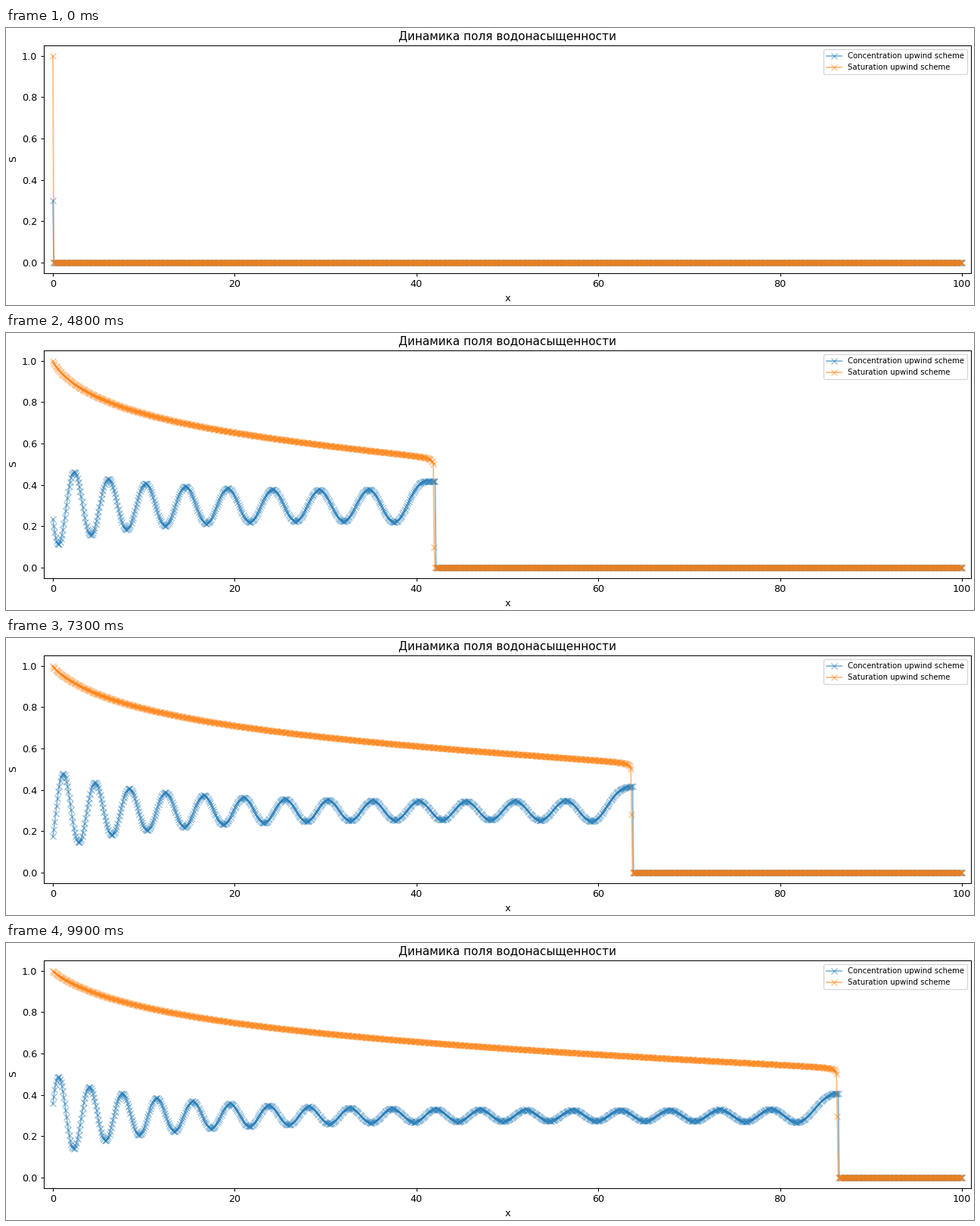
Animation of 1280 by 366 pixels, one loop 10 s. Source, as a matplotlib script:

```python
import numpy as np
import matplotlib.pyplot as plt
from matplotlib.animation import FuncAnimation

W, H, DPI = 1280, 366, 640 / 7
FRAMES, INTERVAL = 100, 100

# Grid and time stepping
CELLS, LENGTH = 1000, 100.0
FRAME_TIME, SUBSTEPS = 0.5856, 13
MOBILITY = 0.25
DRY = 1e-30

x = np.linspace(0, LENGTH, CELLS)
dt = FRAME_TIME / SUBSTEPS
ratio = dt / (x[1] - x[0])


def flux(s):
    """Fractional flow of water."""
    water = s ** 2.5
    return water / (water + MOBILITY * (1 - s) ** 2)


def inlet(t):
    return 0.3 + 0.2 * np.sin(2 * t)


def step(s, c, t):
    """One upwind step for saturation and the concentration it carries."""
    f = flux(s)
    s_new, c_new = s.copy(), np.zeros_like(c)
    s_new[1:] -= ratio * np.diff(f)
    wet = s_new[1:] > DRY
    share = ratio * f[:-1] / np.where(wet, s_new[1:], 1)
    c_new[1:] = np.where(wet, c[1:] - share * np.diff(c), 0)
    c_new[0] = inlet(t)
    return s_new, c_new


def simulate():
    s, c = np.zeros(CELLS), np.zeros(CELLS)
    s[0], c[0] = 1, inlet(0)
    history = [(s, c)]
    for n in range(1, (FRAMES - 1) * SUBSTEPS + 1):
        s, c = step(s, c, n * dt)
        if n % SUBSTEPS == 0:
            history.append((s, c))
    return history


history = simulate()

plt.rcParams["font.family"] = "DejaVu Sans"
# The small surplus keeps the pixel size from rounding down
fig = plt.figure(figsize=((W + 0.001) / DPI, (H + 0.001) / DPI), dpi=DPI,
                 facecolor="white")
left, right, top, bottom = 50, 1276.2, 22.95, 323.55
ax = fig.add_axes([left / W, 1 - bottom / H, (right - left) / W, (bottom - top) / H])
ax.set_xlim(-1, 101)
ax.set_ylim(-0.05, 1.05)
ax.set_title("Динамика поля водонасыщенности")
ax.set_xlabel("x")
ax.set_ylabel("S")

style = dict(marker="x", alpha=0.5)
c_line, = ax.plot(x, history[0][1], color="tab:blue",
                  label="Concentration upwind scheme", **style)
s_line, = ax.plot(x, history[0][0], color="tab:orange",
                  label="Saturation upwind scheme", **style)
ax.legend(loc="upper right", fontsize=8)


def update(i):
    s, c = history[i]
    s_line.set_ydata(s)
    c_line.set_ydata(c)
    return c_line, s_line


anim = FuncAnimation(fig, update, frames=FRAMES, interval=INTERVAL,
                     repeat=True, repeat_delay=0)
plt.show()
```
